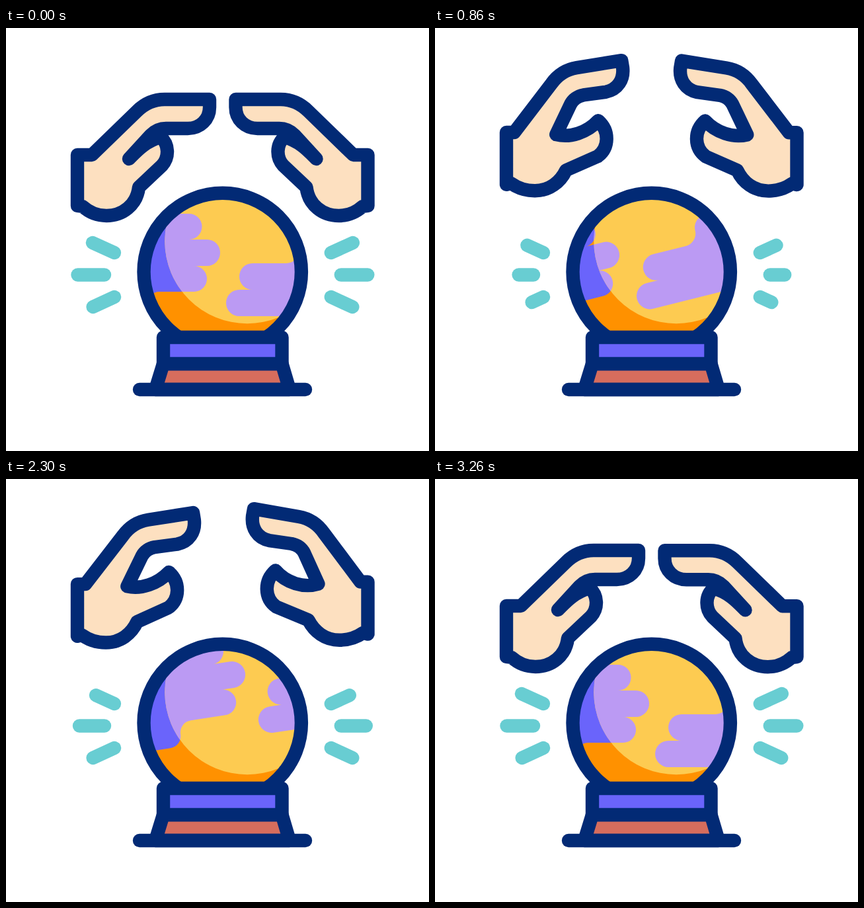
An HTML page for the animation above (3.3 s loop, 640 by 640 pixels).

```html
<!DOCTYPE html>
<html lang="en">
<head>
<meta charset="utf-8">
<title>Crystal ball</title>
<style>
  html, body { margin: 0; width: 100%; height: 100%; overflow: hidden; background: #fff; }
  svg { display: block; width: 100vw; height: 100vh; }
  .line { stroke: #022a75; stroke-width: 20.4; stroke-linecap: round; stroke-linejoin: round; }
  #rays { stroke: #68cdd2; stroke-width: 20.4; stroke-linecap: round; }
</style>
</head>
<body>
<svg viewBox="0 0 640 640">
  <defs>
    <clipPath id="ball"><circle cx="327.7" cy="369" r="119"/></clipPath>
    <clipPath id="light"><circle cx="365" cy="322.5" r="124.7"/></clipPath>
    <path id="cloud" d="M478 436H353a20 20 0 0 1 0-40H373a20 20 0 0 1 0-40H424a19.5 19.5 0 0 0 19.5-19.5a19.5 19.5 0 0 1 19.5-19.5H483a18 18 0 0 0 18-18a18 18 0 0 1 18-18H560a19.5 19.5 0 0 1 0 39H587a20 20 0 0 1 0 40H567.5a19.5 19.5 0 0 1 0 39H515a18.5 18.5 0 0 0-18.5 18.5a18.5 18.5 0 0 1-18.5 18.5Z"/>
    <g id="clouds">
      <use href="#cloud" x="-283"/><use href="#cloud"/><use href="#cloud" x="283"/>
    </g>
  </defs>

  <g id="rays"></g>

  <g clip-path="url(#ball)">
    <path fill="#ff9100" d="M190 230H470V500H190Z"/>
    <use href="#clouds" fill="#6a64fb"/>
    <g clip-path="url(#light)">
      <path fill="#fdcb51" d="M190 190H500V460H190Z"/>
      <use href="#clouds" fill="#bb9af3"/>
    </g>
  </g>
  <circle class="line" cx="327.7" cy="369" r="119.2" fill="none"/>

  <path class="line" fill="#d66d5d" d="M238 508L226 547H429L417.5 508Z"/>
  <path class="line" fill="#6a64fb" d="M238 468H417.5V508H238Z"/>
  <path class="line" d="M202 547H453"/>

  <path id="left" class="line" fill="#fde0c0"/>
  <path id="right" class="line" fill="#fde0c0"/>
</svg>
<script>
const LOOP = 3300;
const $ = id => document.getElementById(id);

// Smooth curve through [time, value] keys, without overshoot and level at both ends
function curve(...keys) {
  const slope = i => (keys[i + 1][1] - keys[i][1]) / (keys[i + 1][0] - keys[i][0]);
  const tangents = keys.map((_, i) => {
    if (!i || i === keys.length - 1) return 0;
    const a = slope(i - 1), b = slope(i);
    return a * b <= 0 ? 0 : 2 * a * b / (a + b);
  });
  return t => {
    let i = 0;
    while (i < keys.length - 2 && t > keys[i + 1][0]) i++;
    const [t0, v0] = keys[i], [t1, v1] = keys[i + 1];
    const h = t1 - t0, u = (t - t0) / h, w = 1 - u;
    return v0 * w * w * (1 + 2 * u) + v1 * u * u * (1 + 2 * w)
      + h * u * w * (tangents[i] * w - tangents[i + 1] * u);
  };
}

const cloudX = curve([0, 0], [380, -5.5], [860, -38.5], [1420, -105], [1880, -177.5], [2660, -270], [LOOP, -283]);
const cloudY = curve([0, 0], [380, 0], [860, -3], [1420, -4], [1880, -9], [2660, -2], [LOOP, 0]);
const cloudTurn = curve([0, 0], [380, -2.5], [860, -14], [1420, -28], [1880, -18.5], [2660, -2.7], [LOOP, 0]);

const opening = curve([0, 0], [380, .44], [540, .78], [860, .92], [1080, .94], [1420, .955],
  [1620, .98], [1880, 1], [2170, 1.08], [2660, 0], [LOOP, 0]);
const dip = curve([0, 0], [2560, 0], [2660, 12], [2720, 14], [3260, 0], [LOOP, 0]);

const closed = "M108 192L130 192L198 126C210 114 224 108 240 108L308 108L308 120C308 138 294 152 275 152L242 152C233 152 226 155 219 162L186 198C198 186 210 172 234 165C247 176 247 196 236 208L201 241C198 268 176 284 152 284C138 284 126 279 116 270L108 269Z";
const open = "M108 155L119 155L174 81C183 68 195 59 212 56L280 44L282 55C284 73 275 88 257 92L223 97C214 99 208 103 204 111L183 158C205 165 232 157 248 138C266 154 265 180 247 193L198 213C189 230 173 243 151 243C137 243 125 239 115 232L108 234Z";
const openNumbers = open.match(/\d+/g).map(Number);

function pose(id, t, mirror) {
  const m = opening(t);
  let i = 0;
  $(id).setAttribute("d", closed.replace(/\d+/g, n => (+n + (openNumbers[i++] - n) * m).toFixed(2)));
  $(id).setAttribute("transform", `translate(${mirror ? 655.5 : 0} ${dip(t)}) scale(${mirror ? -1 : 1} 1)`);
}

// Inner end, outer end, how far it shrinks, when it starts
const rays = [
  [164, 340, 131, 325, 15.5, 130],
  [149, 373.5, 108.5, 373.5, 23, 215],
  [164, 407, 131.5, 422, 15.5, 310]
];
const PULSE = 990;

function drawRays(t) {
  const lines = rays.map(([x1, y1, x2, y2, size, start]) => {
    const phase = Math.min(Math.max((t - start) / PULSE, 0), 3);
    const shrink = size * Math.sin(Math.PI * phase) ** 2;
    const y = y2 + (y1 - y2) * shrink / (x1 - x2);
    return `<path d="M${x1} ${y1}L${x2 + shrink} ${y}"/>`;
  }).join("");
  $("rays").innerHTML = lines + `<g transform="translate(655.8 0) scale(-1 1)">${lines}</g>`;
}

function draw(now) {
  const t = now % LOOP;
  $("clouds").setAttribute("transform",
    `translate(${cloudX(t)} ${cloudY(t)}) rotate(${cloudTurn(t)} 327.5 369)`);
  pose("left", t, false);
  pose("right", (t + LOOP - 40) % LOOP, true);
  drawRays(t);
}

const begin = performance.now();
function tick() {
  draw(performance.now() - begin);
  requestAnimationFrame(tick);
}
tick();
</script>
</body>
</html>
```
